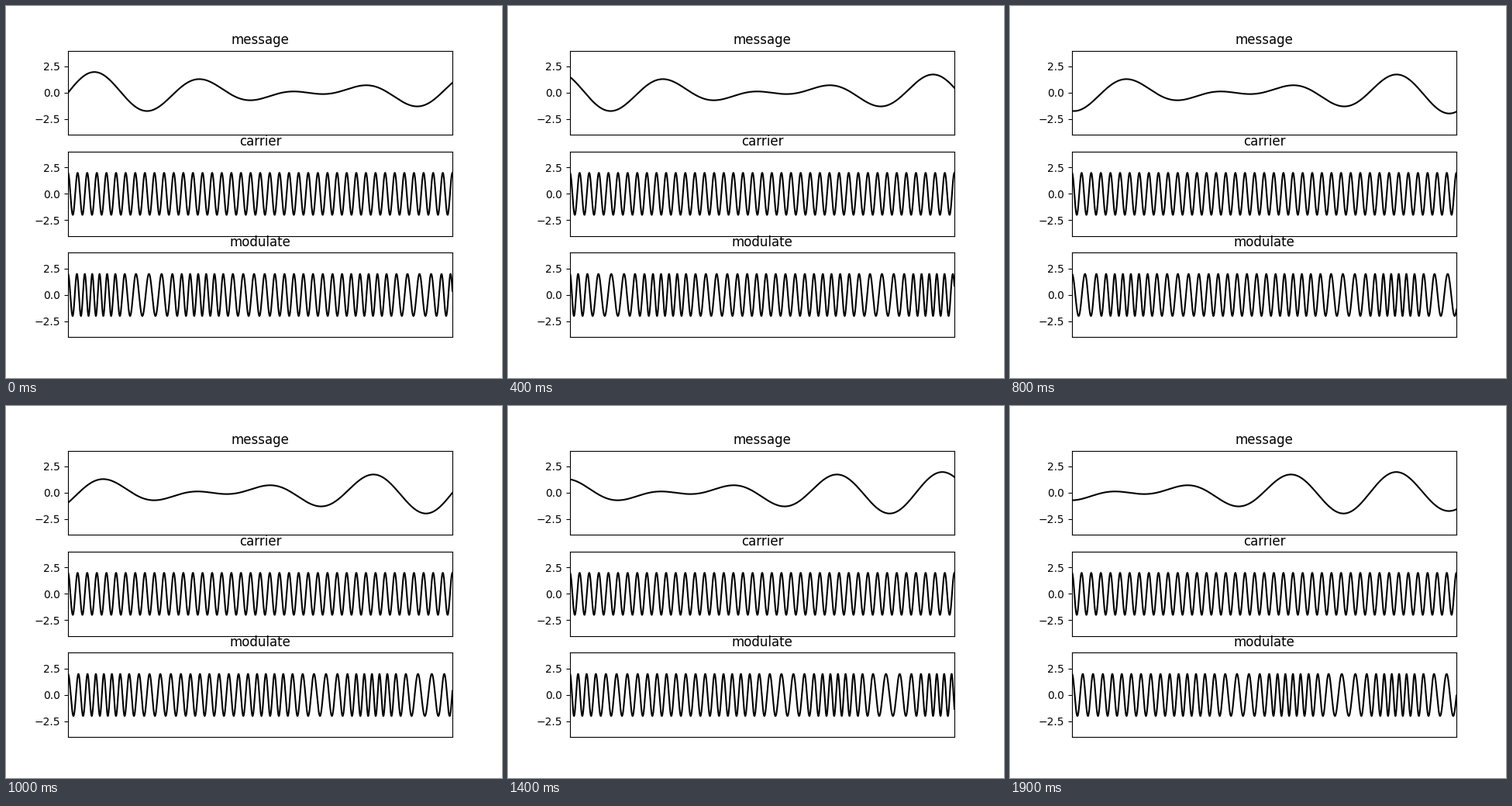
Recreate the animation shown at these times as a matplotlib script. Size 640 by 480 pixels, loop 2 s.

```python
import numpy as np
import matplotlib.pyplot as plt
from matplotlib.animation import FuncAnimation

SPAN = 0.4            # seconds of signal on screen
STEP = 0.01           # scroll per frame
FRAMES = 20
TONES = (8, 10)       # message frequencies in Hz
CARRIER = 100         # Hz
SENSITIVITY = 100     # rad/s per unit of message
AMP = 2

t = np.linspace(0, SPAN, 4001)


def message(x):
    return sum(np.sin(2 * np.pi * f * x) for f in TONES)


def message_integral(x):
    return sum(-np.cos(2 * np.pi * f * x) / (2 * np.pi * f) for f in TONES)


def modulated(start):
    swing = message_integral(t + start) - message_integral(start)
    return AMP * np.cos(2 * np.pi * CARRIER * t + SENSITIVITY * swing)


def add_plot(ax, title):
    ax.set_title(title)
    ax.set_xlim(0, SPAN)
    ax.set_ylim(-4, 4)
    ax.set_xticks([])
    ax.set_yticks([-2.5, 0, 2.5])
    return ax.plot([], [], color="black", lw=1.5)[0]


plt.rcParams["font.family"] = "DejaVu Sans"
fig, axes = plt.subplots(3, 1, figsize=(6.4, 4.8), dpi=100)
msg_line, car_line, mod_line = [
    add_plot(ax, name)
    for ax, name in zip(axes, ("message", "carrier", "modulate"))
]
car_line.set_data(t, AMP * np.cos(2 * np.pi * CARRIER * t))


def update(i):
    start = i * STEP
    msg_line.set_data(t, message(t + start))
    mod_line.set_data(t, modulated(start))
    return msg_line, mod_line


anim = FuncAnimation(fig, update, frames=FRAMES, interval=100,
                     repeat=True, repeat_delay=0, blit=False)
plt.show()
```
